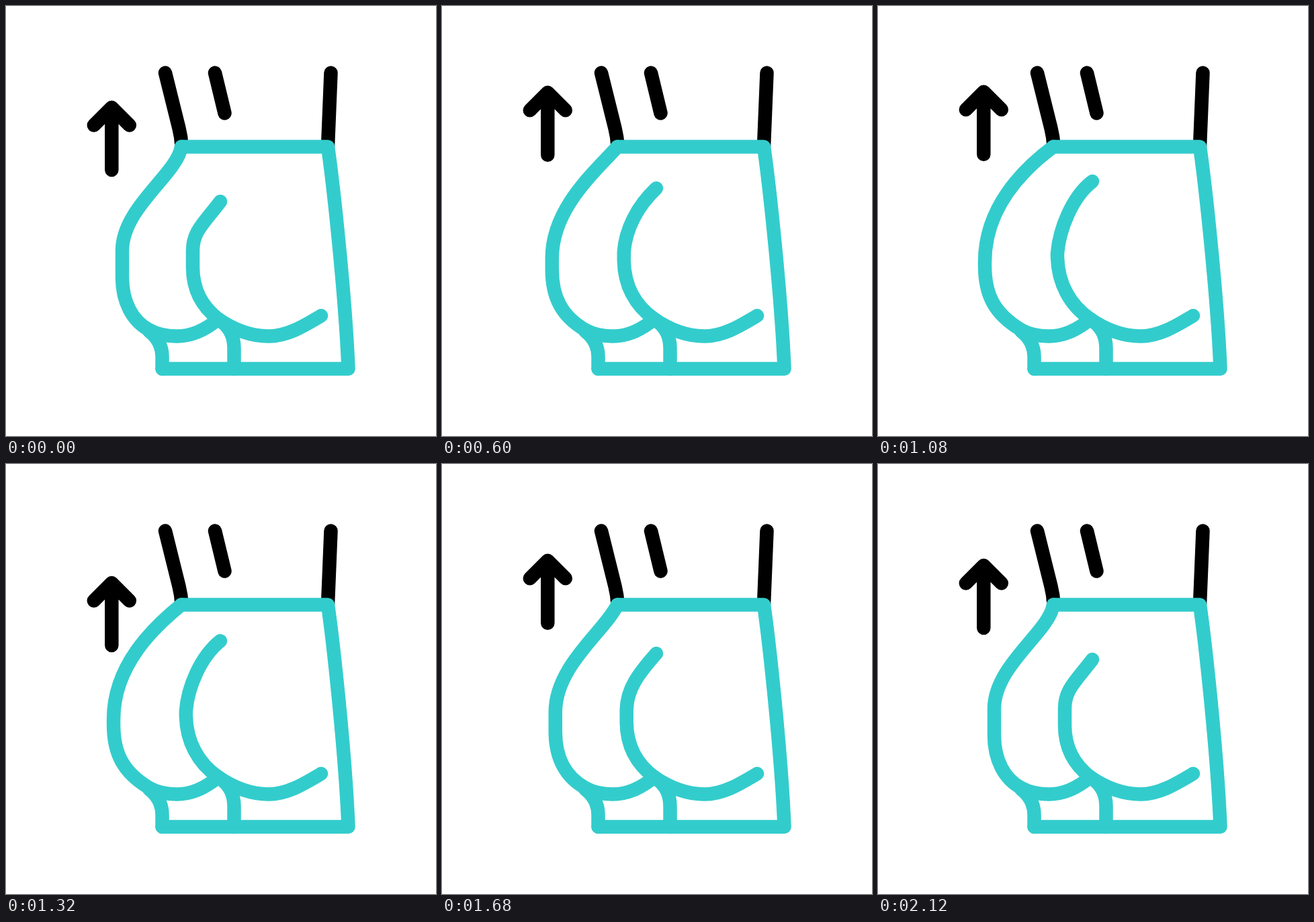
These frames come from a looping animation (640x640 px, 2400 ms). An HTML page:

```html
<!DOCTYPE html>
<html lang="en">
<head>
<meta charset="utf-8">
<title>Lift icon</title>
<style>
  html, body { margin: 0; width: 100%; height: 100%; overflow: hidden; background: #fff; }
  svg { display: block; width: 100vw; height: 100vh; }
  g { fill: none; stroke-width: 20.5; stroke-linecap: round; stroke-linejoin: round; }
  .ink { stroke: #000; }
  .teal { stroke: #33cccc; }
</style>
</head>
<body>
<svg viewBox="0 0 640 640">
  <g class="ink">
    <path d="M237 99.5L257.500 182Q261 196 261.500 209M311 99.5L325.500 159.500M483.500 99.500L479 209"/>
    <path id="arrow" d="M157.300 151V243.500M130.800 177L157.300 150.500L183.800 177"/>
  </g>
  <g class="teal">
    <!-- waist, side and hem -->
    <path d="M261 209.500H479C487 265 505 430 509.500 540H232.500"/>
    <!-- lower folds -->
    <path d="M213 482C226 489 240 491.500 254 491.500C276 491.500 297 482 316 466C338 481 362 491.500 391 491.500C420 491.500 446 474.500 469 461"/>
    <!-- legs -->
    <path d="M232.500 540V522C232.500 506 226 494 213 484M316 466C332 477 339.500 490 339.500 510V540"/>
    <path id="outer"/>
    <path id="inner"/>
  </g>
</svg>
<script>
const LOOP = 2400, STEP = 20, HALF = 1060;
const SWING = 30, ARROW_SHIFT = 0.6;
const beats = [0, 240, 528, 768, 1008, 1260, 1520, 1780];

const el = id => document.getElementById(id);

// Symmetric cubic-bezier(.6, 0, .4, 1)
function ease(x) {
  if (x <= 0 || x >= 1) return x <= 0 ? 0 : 1;
  let lo = 0, hi = 1, s;
  for (let i = 0; i < 24; i++) {
    s = (lo + hi) / 2;
    const bx = 1.8 * s * (1 - s) ** 2 + 1.2 * s * s * (1 - s) + s ** 3;
    if (bx < x) lo = s; else hi = s;
  }
  return s * s * (3 - 2 * s);
}

// The arrow rests at both ends and alternates down and up on the beats between.
function bob(t) {
  const last = beats.length - 1;
  const dy = i => i === 0 || i === last ? 0 : i % 2 ? SWING : -SWING;
  const i = beats.findIndex(b => b > t);
  if (i < 0) return 0;
  const p = ease((t - beats[i - 1]) / (beats[i] - beats[i - 1]));
  return dy(i - 1) + (dy(i) - dy(i - 1)) * p;
}

// Points are given at rest, with the distance each travels at full lift.
function shapeAt(lift) {
  const pt = (x, y, dx, dy) => `${(x + dx * lift).toFixed(2)} ${(y + dy * lift).toFixed(2)} `;
  return {
    outer: "M261 209.5C" + pt(255, 250, -39, -7) + pt(173, 300, -14, 0) + pt(173, 364, -14, 17) +
      "L" + pt(173, 404, -14, -18) +
      "C" + pt(173, 440, -14, -10) + pt(188, 469, -15, -11) + "213 482",
    inner: "M" + pt(319, 291, 0, -30) +
      "C" + pt(293, 325, -4, -41) + pt(278, 336, -8, -4) + pt(278, 364, -11, 4) +
      "L" + pt(278, 389, -11, -15) +
      "C" + pt(278, 420, -10, -8) + pt(290, 446, -5, -1) + "316 466"
  };
}

function draw(now) {
  const t = Math.floor((now % LOOP) / STEP) * STEP;
  const shape = shapeAt(ease(1 - Math.abs(t - HALF) / HALF));
  for (const id in shape) el(id).setAttribute("d", shape[id]);
  el("arrow").setAttribute("transform", `translate(0 ${(bob(t) + ARROW_SHIFT).toFixed(2)})`);
}

function tick() {
  draw(performance.now());
  requestAnimationFrame(tick);
}
tick();
</script>
</body>
</html>
```
